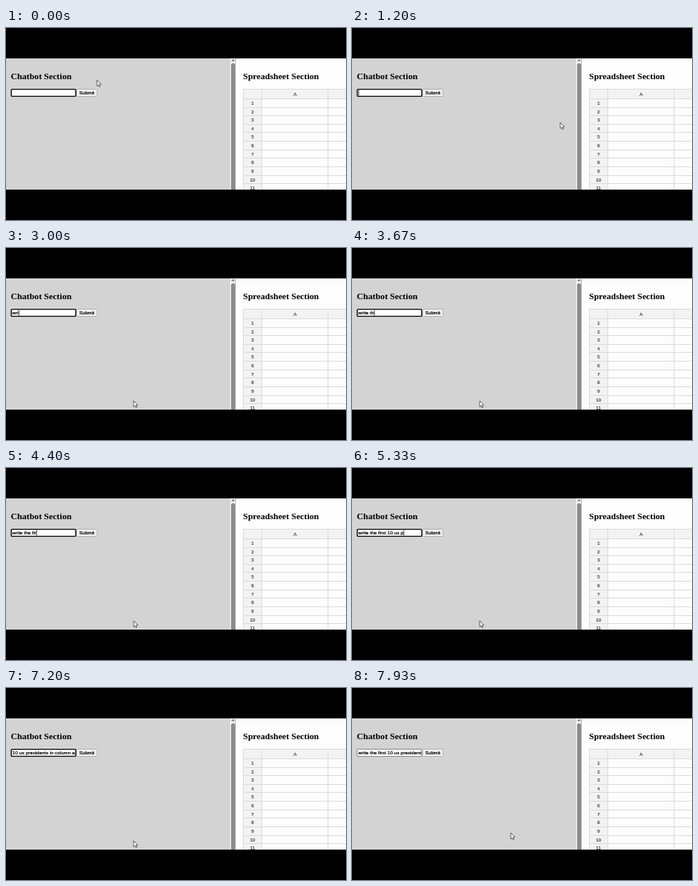
These frames come from a looping animation (426 by 240 pixels, 8 s). An HTML page with a canvas:

```html
<!DOCTYPE html>
<html lang="en">
<head>
<meta charset="utf-8">
<title>Chatbot and spreadsheet</title>
<style>
html, body { margin: 0; width: 100%; height: 100%; overflow: hidden; background: #000; }
canvas { display: block; width: 100vw; height: 100vh; }
</style>
</head>
<body>
<canvas id="stage"></canvas>
<script>
const W = 426, H = 240, LOOP = 8000;
const TOP = 38, BOTTOM = 202;
const PROMPT = 'write the first 10 us presidents in column a';
const SANS = '"Liberation Sans", Arial, sans-serif';
const SERIF = '"Liberation Serif", "Times New Roman", serif';
const HEADING = `bold 11.1px ${SERIF}`;
const CONTROL = `6.15px ${SANS}`;
const CELL = `6px ${SANS}`;
const BLUR_AT = 7300;

// [time, value...] keys
const POINTER = [[0, 114, 65], [300, 124, 67], [1200, 261, 118], [2300, 160, 191],
                 [7450, 160, 191], [7930, 199, 181]];
const TYPED = [[2600, 0], [3000, 3.3], [4400, 13.3], [5330, 23.3], [6400, 38.3], [6850, 44]];

const canvas = document.getElementById('stage');
const ctx = canvas.getContext('2d');

function resize() {
  const dpr = window.devicePixelRatio || 1;
  canvas.width = Math.round(innerWidth * dpr);
  canvas.height = Math.round(innerHeight * dpr);
}

function sample(keys, t, ease = k => k) {
  if (t <= keys[0][0]) return keys[0].slice(1);
  for (let i = 1; i < keys.length; i++) {
    const a = keys[i - 1], b = keys[i];
    if (t < b[0]) {
      const k = ease((t - a[0]) / (b[0] - a[0]));
      return a.slice(1).map((v, j) => v + (b[j + 1] - v) * k);
    }
  }
  return keys[keys.length - 1].slice(1);
}

const smooth = k => k * k * (3 - 2 * k);

function rect(x, y, w, h, color) {
  ctx.fillStyle = color;
  ctx.fillRect(x, y, w, h);
}

function paint(fill, stroke, line) {
  ctx.fillStyle = fill;
  ctx.fill();
  if (!stroke) return;
  ctx.strokeStyle = stroke;
  ctx.lineWidth = line;
  ctx.stroke();
}

function box(x, y, w, h, r, fill, stroke, line) {
  ctx.beginPath();
  ctx.roundRect(x, y, w, h, r);
  paint(fill, stroke, line);
}

function polygon(points, fill, stroke, line) {
  ctx.beginPath();
  points.forEach(([x, y]) => ctx.lineTo(x, y));
  ctx.closePath();
  paint(fill, stroke, line);
}

// A hairline outline keeps small type as dark as it is on screen.
function text(str, x, y, font, { color = '#000', align = 'left', weight = 0 } = {}) {
  ctx.font = font;
  ctx.fillStyle = ctx.strokeStyle = color;
  ctx.textAlign = align;
  ctx.fillText(str, x, y);
  if (!weight) return;
  ctx.lineWidth = weight;
  ctx.strokeText(str, x, y);
}

function drawInput(t) {
  const focused = t < BLUR_AT;
  if (focused) box(6.6, 76.6, 80.8, 8.8, 1.2, '#fff', '#101010', 1.4);
  else box(6.4, 76.5, 81.2, 9, 0.6, '#fff', '#767676', 0.8);

  const count = Math.floor(sample(TYPED, t)[0]);
  const str = PROMPT.slice(0, count);
  const left = 7.8, right = 87;
  ctx.save();
  ctx.beginPath();
  ctx.rect(left, 77, right - left, 8);
  ctx.clip();
  ctx.font = CONTROL;
  const width = ctx.measureText(str).width;
  const scroll = focused ? Math.max(0, width + 0.8 - (right - left)) : 0;
  text(str, left - scroll, 83, CONTROL, { weight: 0.2 });
  const typing = t >= 2600 && t < 6900;
  const blinkOn = (t % 1060) >= 100 && (t % 1060) < 630;
  if (focused && (typing || blinkOn)) rect(left - scroll + width + 0.1, 77.5, 0.7, 7, '#000');
  ctx.restore();
}

function drawChat(t) {
  rect(0, TOP, 281, BOTTOM - TOP, '#d3d3d3');
  text('Chatbot Section', 6, 64, HEADING);
  drawInput(t);
  box(88.5, 76.5, 25.6, 9, 1, '#efefef', '#959595', 0.6);
  text('Submit', 101.2, 83, CONTROL, { align: 'center', weight: 0.2 });
}

function drawScrollbar() {
  rect(281, TOP, 6.5, BOTTOM - TOP, '#f8f8f8');
  polygon([[282, 41.4], [284.5, 38.6], [287, 41.4]], '#858585');
  box(282, 44, 5, BOTTOM - 40, 2.5, '#8b8b8b');
}

function drawSheet() {
  const left = 297, colA = 320, colB = 403, top = 76, first = 88, pitch = 10.62;
  const label = { color: '#303030', align: 'center', weight: 0.12 };
  const line = '#dcdcdc';
  rect(287.5, TOP, W - 287.5, BOTTOM - TOP, '#fdfdfd');
  text('Spreadsheet Section', 297, 64, HEADING);
  rect(left, top, W - left, first - top, '#f3f3f3');
  rect(left, top, colA - left, BOTTOM - top, '#f3f3f3');
  rect(left, top, W - left, 1, line);
  for (const x of [left, colA, colB]) rect(x, top, 1, BOTTOM - top, line);
  text('A', 362.2, 85.2, CELL, label);
  for (let row = 0; row < 11; row++) {
    const y = first + row * pitch;
    rect(left, Math.round(y), W - left, 1, line);
    text(String(row + 1), 308.8, y + 8, CELL, label);
  }
}

function drawPointer(t) {
  const [x, y] = sample(POINTER, t, smooth);
  ctx.save();
  ctx.translate(x, y);
  ctx.lineJoin = 'round';
  polygon([[0, 0], [0, 7.6], [1.7, 6.1], [2.8, 8.6], [4, 8.1], [2.9, 5.6], [5.2, 5.4]],
          '#fff', '#303038', 0.7);
  ctx.restore();
}

function draw(t) {
  ctx.setTransform(canvas.width / W, 0, 0, canvas.height / H, 0, 0);
  rect(0, 0, W, H, '#000');
  ctx.save();
  ctx.beginPath();
  ctx.rect(0, TOP, W, BOTTOM - TOP);
  ctx.clip();
  drawChat(t);
  drawScrollbar();
  drawSheet();
  drawPointer(t);
  ctx.restore();
}

function frame() {
  draw(performance.now() % LOOP);
  requestAnimationFrame(frame);
}

addEventListener('resize', resize);
resize();
frame();
</script>
</body>
</html>
```
